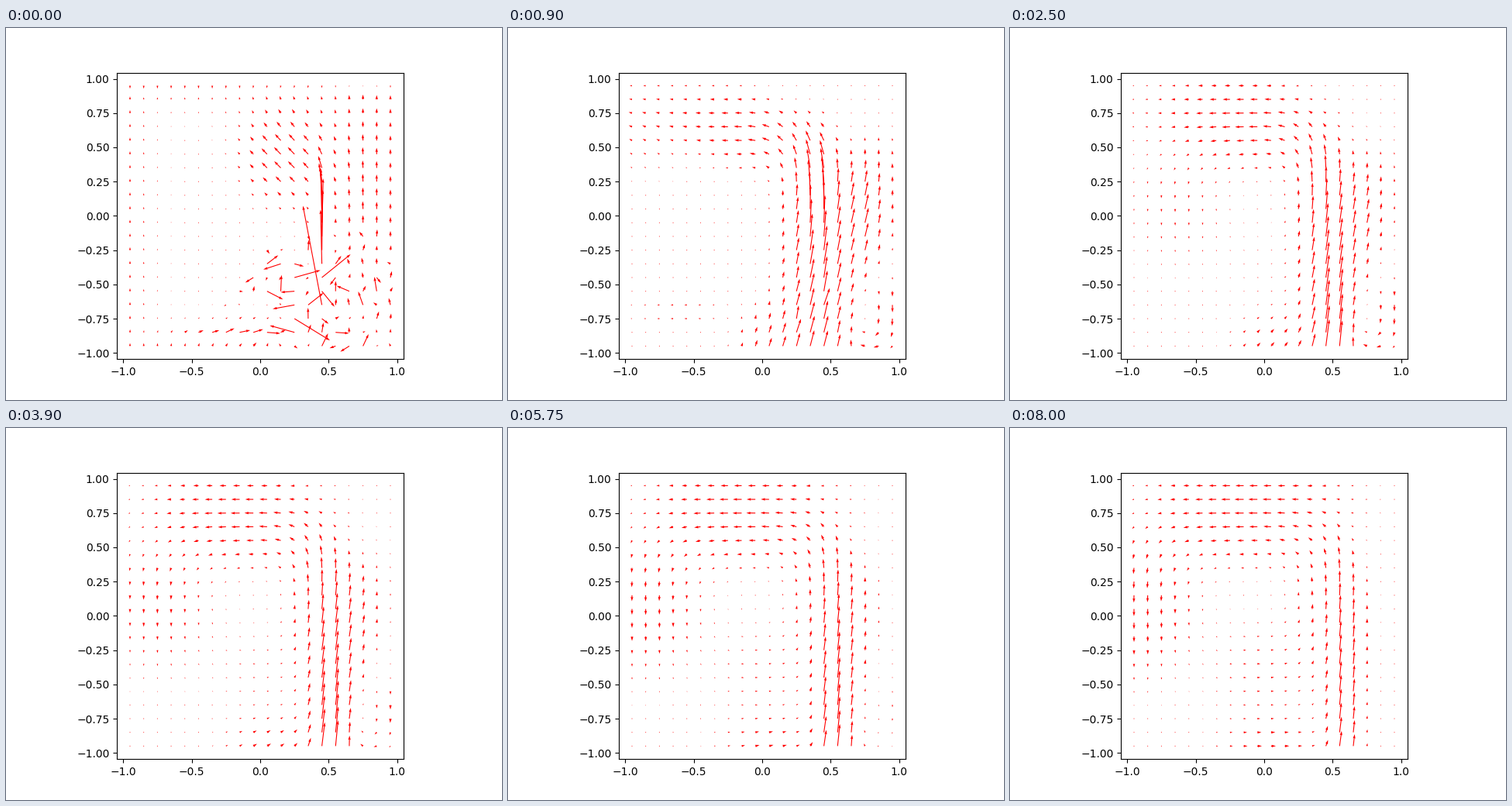
A matplotlib script for the animation above (8050 ms loop, 640 by 480 pixels).

```python
import matplotlib.pyplot as plt
import numpy as np
from matplotlib.animation import FuncAnimation

FRAMES, STEP = 161, 50

# positions and velocities are complex: x + iy
axis = np.linspace(-0.95, 0.95, 20)
X, Y = np.meshgrid(axis, axis)
Z = X + 1j * Y

rng = np.random.default_rng(11)
GUSTS = rng.exponential(26, X.shape) * np.exp(2j * np.pi * rng.random(X.shape))
RIM = np.maximum(abs(X), abs(Y)) ** 3


def puff(velocity, centre, size, z=Z):
    """Gaussian patch of flow; size holds the x and y half-widths."""
    d = z - centre
    return velocity * np.exp(-(d.real / size.real) ** 2 - (d.imag / size.imag) ** 2)


def opening(t):
    """Turbulent start: gusts near the floor under a gentle rising flow."""
    rising = 4.5j * RIM * np.sign(0.9 - Y)
    rising = rising + puff(8j, 0.75 + 0.1j, 0.22 + 0.8j)
    curl = puff(-9 + 9j, 0.2 + 0.42j, 0.32 + 0.33j)
    spout = puff(75j, 0.45 - 0.2j, 0.05 + 0.38j)
    floor = puff(14, -0.1 - 0.85j, 0.4 + 0.08j)
    gusts = puff(GUSTS * np.exp(4j * t), 0.42 - 0.62j, 0.38 + 0.32j)
    return rising + curl + spout + floor + gusts


def settled(p):
    """Jet feeding a vortex; p runs from 0 (young) to 1 (steady)."""
    def mix(a, b):
        return a + (b - a) * p

    young, eddy = (1 - p) ** 2, 1 - p ** 2
    bent = Z + mix(0.4, 0.15) * np.maximum(Y - 0.25, 0)
    slanted = Z + 0.5 * (1 - p) * (Y - 0.75)

    # rising jet with its early surge and passing boost at the inlet
    w = puff(mix(6 + 23j, 1.5 + 21j), mix(0.42 - 0.5j, 0.58 - 0.7j), mix(0.24 + 1.2j, 0.13 + 1.3j), bent)
    w = w + puff(7j, 0.4 + 0.2j, 0.25 + 0.7j, bent)
    w += puff((-6 + 18j) * (1 - p) ** 3, 0.41 + 0.2j, 0.1 + 0.42j)
    w += puff(72j * p * (1 - p), 0.5 - 1j, 0.1 + 0.6j)
    # right side: lift above, eddy below
    w += puff(mix(4 + 13j, 2j), 0.74, 0.13 + 0.4j)
    w += puff(mix(8j, 0), 0.88 + 0.25j, 0.22 + 0.5j)
    w += puff(-11j * eddy, 0.92 - 0.68j, 0.17 + 0.25j)
    w += puff(-8 * eddy, 0.8 - 0.93j, 0.15 + 0.13j)
    # top stream, descending left side, floor return
    w += puff(mix(-11, -12), mix(-0.1 + 0.62j, -0.12 + 0.8j), mix(0.5 + 0.3j, 0.68 + 0.42j), slanted)
    w += puff(-10.5j * p, mix(-0.4, -0.95) + 0.2j, 0.45 + 0.6j)
    w += puff(mix(3 + 9j, 5), 0.05 - 0.95j, mix(0.25 + 0.3j, 0.4 + 0.18j))
    w += puff(4 * p, -0.4j, 0.45 + 0.5j)
    # early drift to the left
    w += puff((-4 + 4j) * young, -0.9 + 0.7j, 0.4 + 0.4j)
    w += puff(-4 * young, -0.6 - 0.7j, 0.45 + 0.12j)
    return w.real + 1j * w.imag * np.tanh((0.9 - Y) / 0.5)


def field(t):
    """Arrow components in pixels at time t (seconds)."""
    p = np.clip(np.log((t + 0.25) / 1.15) / np.log(8.25 / 1.15), 0, 1)
    fade = np.exp(-t / 0.25)
    w = fade * opening(t) + (1 - fade) * settled(p)
    return w.real, w.imag


fig, ax = plt.subplots(figsize=(6.4, 4.8), dpi=100)
ax.set_aspect("equal")
arrows = ax.quiver(X, Y, *field(0), color="red", scale_units="dots", scale=1)


def update(n):
    arrows.set_UVC(*field(n * STEP / 1000))
    return (arrows,)


anim = FuncAnimation(fig, update, frames=FRAMES, interval=STEP, repeat=True, repeat_delay=0)
plt.show()
```
